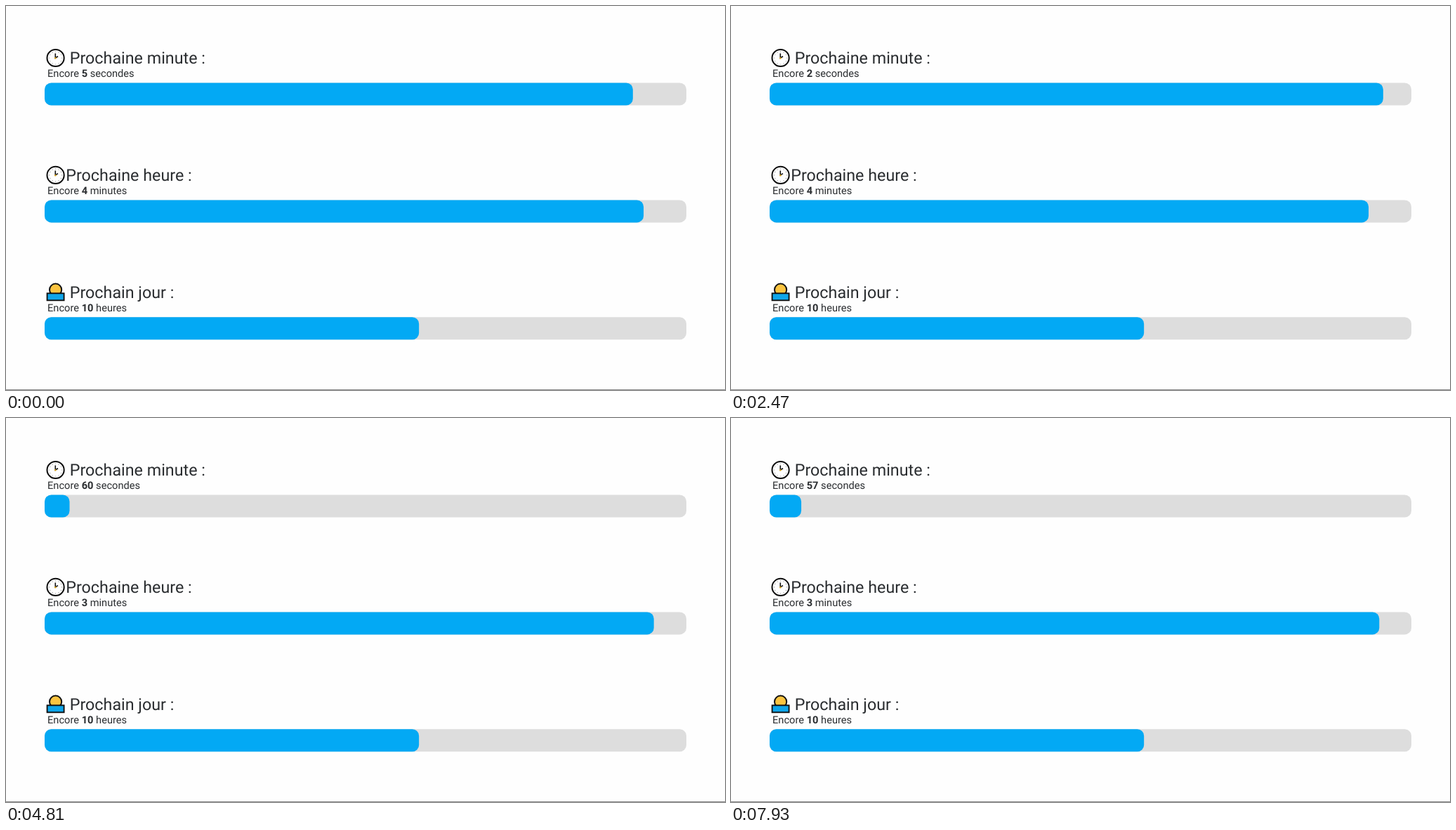
Write an HTML page with a canvas that moves like this. It is 1024 by 547 pixels and loops after 8000 ms.

```html
<!DOCTYPE html>
<html lang="fr">
<head>
<meta charset="utf-8">
<title>Comptes à rebours</title>
<style>
html, body { margin: 0; width: 100%; height: 100%; overflow: hidden; background: #fefefe; }
canvas { display: block; }
</style>
</head>
<body>
<canvas id="stage" width="1024" height="547"></canvas>
<script>
const ctx = document.getElementById('stage').getContext('2d');
const LOOP = 8000, STEP = 130, EASE_MS = 500, LEAD = 115;
const LEFT = 55, WIDTH = 914, BLUE = '#03a9f4', INK = '#2a2d30';
const FONT = 'Roboto, "Liberation Sans", sans-serif';

// Start time and remaining seconds of each tick
const TICKS = [[260, 4], [1430, 3], [2470, 2], [3380, 1],
               [4550, 60], [5590, 59], [6630, 58], [7670, 57]];
const HOUR_TICK = 4550;

// cubic-bezier(.25, .1, .25, 1)
function ease(x) {
  if (x <= 0) return 0;
  if (x >= 1) return 1;
  const bez = (a, b, u) => 3 * a * u * (1 - u) ** 2 + 3 * b * u * u * (1 - u) + u ** 3;
  let lo = 0, hi = 1;
  for (let i = 0; i < 24; i++) {
    const mid = (lo + hi) / 2;
    if (bez(0.25, 0.25, mid) < x) lo = mid; else hi = mid;
  }
  return bez(0.1, 1, lo);
}

const shift = (t, start, from, to) =>
  t < start ? from : from + (to - from) * ease((t - start + LEAD) / EASE_MS);

function pill(x, y, w, h, r, color) {
  if (w <= 0) return;
  ctx.fillStyle = color;
  ctx.beginPath();
  ctx.roundRect(x, y, w, h, Math.min(r, w / 2));
  ctx.fill();
}

function disc(x, y, r, fill, stroke, line) {
  ctx.beginPath();
  ctx.arc(x, y, r, 0, Math.PI * 2);
  ctx.fillStyle = fill;
  ctx.fill();
  if (!stroke) return;
  ctx.strokeStyle = stroke;
  ctx.lineWidth = line;
  ctx.stroke();
}

function clock(x, y) {
  disc(x, y, 12.1, '#fff', '#0c0c0c', 2);
  for (let i = 0; i < 12; i++) {
    const a = i * Math.PI / 6;
    disc(x + 9 * Math.cos(a), y + 9 * Math.sin(a), 0.6, '#8a8a8a');
  }
  ctx.strokeStyle = '#111';
  ctx.lineWidth = 1.6;
  ctx.beginPath();
  ctx.moveTo(x - 0.3, y - 6.5);
  ctx.lineTo(x - 0.3, y);
  ctx.lineTo(x + 3.4, y - 2.3);
  ctx.stroke();
  disc(x - 0.2, y + 0.3, 1.3, '#d9a520');
}

function sunrise(x, y) {
  disc(x, y - 3.6, 8.6, '#fcc440', '#111', 2);
  ctx.fillStyle = '#0fa6ea';
  ctx.fillRect(x - 12, y + 1.5, 24, 10);
  ctx.strokeStyle = '#111';
  ctx.lineWidth = 1.9;
  ctx.strokeRect(x - 12, y + 1.5, 24, 10);
}

function write(text, x, y, size, weight = 400) {
  ctx.font = `${weight} ${size}px ${FONT}`;
  ctx.fillStyle = INK;
  ctx.fillText(text, x, y);
  return x + ctx.measureText(text).width;
}

function row(y, icon, title, titleX, count, unit, part) {
  icon(70.6, y + 74);
  write(title, titleX, y + 82.2, 23.3);
  let x = write('Encore ', 59, y + 101.3, 14.65);
  x = write(count, x, y + 101.3, 14.65, 700);
  write(' ' + unit, x, y + 101.3, 14.65);
  pill(LEFT, y + 109.5, WIDTH, 32, 9.5, '#ddd');
  pill(LEFT, y + 109.5, WIDTH * part, 32, 9.5, BLUE);
}

function draw(now) {
  const t = Math.floor((now % LOOP) / STEP) * STEP;
  let seconds = 5, part = 55 / 60;
  for (const [start, left] of TICKS) {
    if (t < start) break;
    part = shift(t, start, (60 - seconds) / 60, (60 - left) / 60);
    seconds = left;
  }
  ctx.fillStyle = '#fefefe';
  ctx.fillRect(0, 0, 1024, 547);
  ctx.textRendering = 'geometricPrecision';
  row(0, clock, 'Prochaine minute :', 90.7, seconds, 'secondes', part);
  row(166.9, clock, 'Prochaine heure :', 85.2, t < HOUR_TICK ? 4 : 3, 'minutes',
      shift(t, HOUR_TICK, 56 / 60, 57 / 60));
  row(333.8, sunrise, 'Prochain jour :', 90.7, 10, 'heures', 14 / 24);
  ctx.fillStyle = '#8c8c8c';
  ctx.fillRect(0, 546, 1024, 1);
}

const begin = performance.now();
function tick() {
  draw(performance.now() - begin);
  requestAnimationFrame(tick);
}
tick();
</script>
</body>
</html>
```
